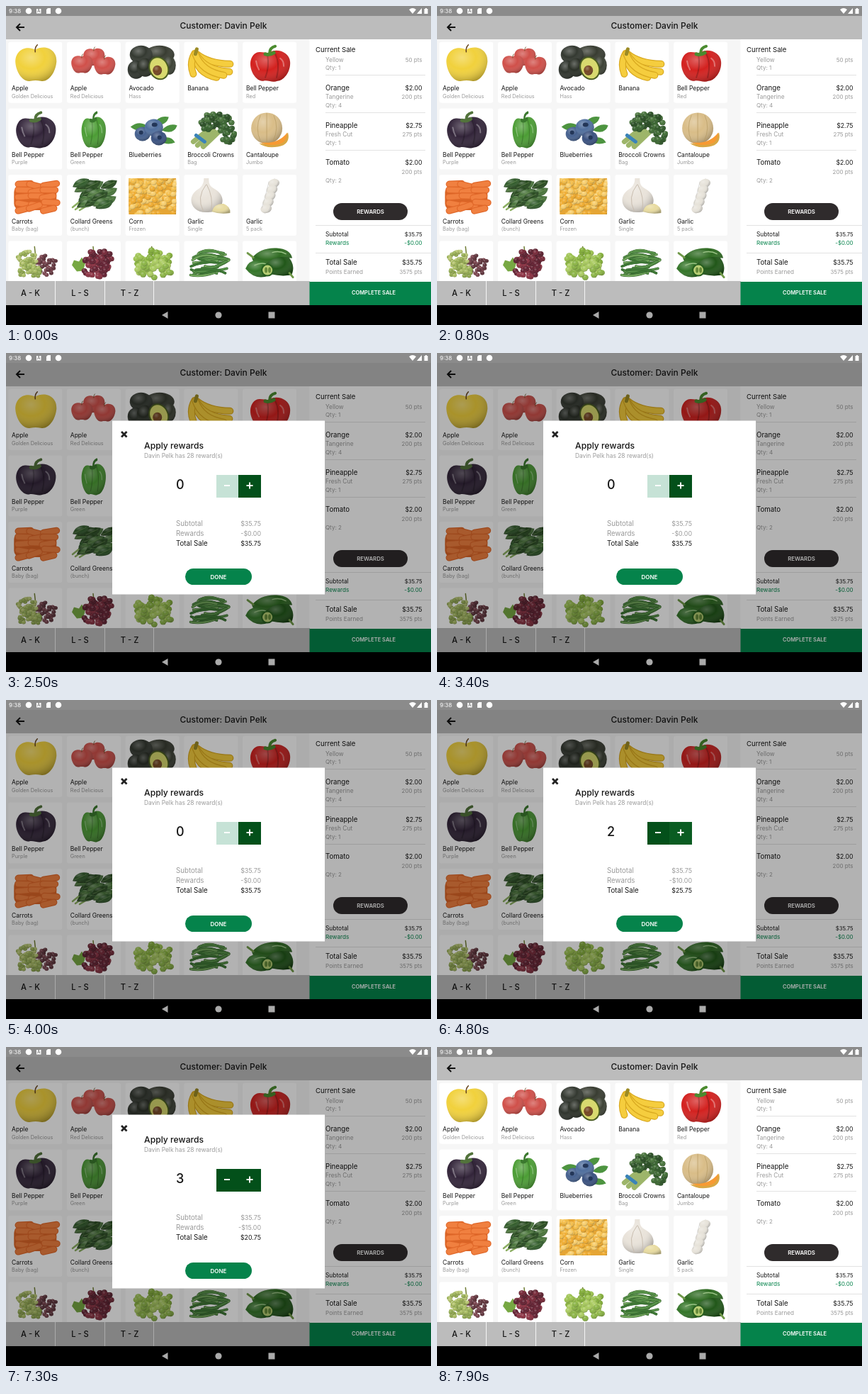
An HTML page for the animation above (8 s loop, 600 px wide and 450 px high).

```html
<!DOCTYPE html>
<html lang="en">
<head>
<meta charset="utf-8">
<title>Produce checkout</title>
<style>
  html, body { margin: 0; width: 100%; height: 100%; overflow: hidden; background: #000; }
  svg { display: block; width: 100vw; height: 100vh; font-family: Inter, sans-serif; }
</style>
</head>
<body>
<svg id="stage" viewBox="0 0 600 450"></svg>
<script>
const INK = '#161616', GRAY = '#999', GREEN = '#05834b', BAR = '#bcbcbc', BUTTON = '#03501a';
const LOOP = 8000, OPEN = 2500, CLOSE = 7600, TAPS = [4100, 4500, 5200];
const CUSTOMER = 'Davin Pelk';

let seed = 7;
const random = () => (seed = seed * 16807 % 2147483647) / 2147483647;

// Markup helpers
const rect = (x, y, w, h, fill, extra = '') =>
  `<rect x="${x}" y="${y}" width="${w}" height="${h}" fill="${fill}" ${extra}/>`;
const text = (x, y, string, size, fill = INK, anchor = 'start', weight = 400, extra = '') =>
  `<text x="${x}" y="${y}" font-size="${size}" fill="${fill}" text-anchor="${anchor}" font-weight="${weight}" ${extra}>${string}</text>`;
const path = (d, fill) => `<path d="${d}" fill="${fill}"/>`;
const line = (d, color, width = 1, cap = 'round') =>
  `<path d="${d}" fill="none" stroke="${color}" stroke-width="${width}" stroke-linecap="${cap}"/>`;
const oval = (x, y, rx, ry, fill, turn = 0) =>
  `<ellipse cx="${x}" cy="${y}" rx="${rx}" ry="${ry}" fill="${fill}" transform="rotate(${turn} ${x} ${y})"/>`;
const ball = (x, y, rx, ry, fill, turn = 0) =>
  oval(x, y, rx, ry, fill, turn) + oval(x, y, rx, ry, 'url(#shade)', turn);
const solid = (d, fill) => path(d, fill) + path(d, 'url(#shade)');
const place = (x, y, sx, sy, content) =>
  `<g transform="translate(${x} ${y}) scale(${sx} ${sy})">${content}</g>`;
const tube = (d, color, edge, width) => line(d, edge, width) + line(d, color, width * .75);

// Balls scattered over an ellipse
const cluster = (count, x, y, rx, ry, r, colors) => {
  let out = '';
  for (let i = 0; i < count; i++) {
    const angle = random() * 6.28, reach = Math.sqrt(random());
    out += ball((x + Math.cos(angle) * rx * reach).toFixed(1), (y + Math.sin(angle) * ry * reach).toFixed(1),
      r, r * .9, colors[i % colors.length]);
  }
  return out;
};

// Produce pictures, in card coordinates
const apple = color =>
  solid('M38 11C51 3 69 10 68 28C66 46 55 57 46 55C41 54 36 54 31 55C20 57 11 42 10 29C9 11 26 4 38 11Z', color) +
  line('M38 14Q37 8 41 4', '#6b4a22', 1.6);
const pepper = (color, stem) =>
  solid('M14 20C20 10 31 16 37 15C48 8 66 14 67 28C68 43 57 55 49 55C42 58 36 53 29 55C17 56 5 33 14 20Z', color) +
  line('M35 18Q38 35 32 50M46 17Q53 30 48 50', '#0003', 2) +
  line('M19 27Q20 34 23 39M53 23Q58 26 58 34', '#fff5', 2) +
  line('M32 17Q38 19 44 15', stem, 5) + line('M38 16Q38 8 46 6', stem, 4);
const bananas = () =>
  ['M18 17Q34 30 65 31', 'M17 17Q29 40 64 42', 'M16 17Q17 44 46 50', 'M15 16Q7 30 13 45', 'M16 17Q25 42 56 47']
    .map(d => tube(d, '#f5cd3e', '#d9a920', 10)).join('') + line('M16 17L18 10', '#9c8b25', 5);
const avocados = () =>
  ball(48, 18, 21, 13, '#393d32') + ball(22, 18, 16, 13, '#343931') + ball(15, 39, 12, 13, '#30352e') +
  ball(28, 36, 12, 13, '#2c3128') + ball(62, 33, 9, 13, '#3d4236') + oval(47, 37, 17, 14, '#4b5d22', 65) +
  oval(47, 37, 15, 12, '#d8d96f', 65) + ball(45, 40, 6.5, 7, '#754621');
const blueberries = () =>
  path('M7 26Q21 15 33 27Q19 36 7 26ZM39 25Q45 9 61 12Q59 24 39 25ZM51 31Q61 20 73 24Q68 38 51 31ZM52 42Q64 38 70 48Q58 53 50 46Z', '#4d9440') +
  ball(24, 36, 11, 10, '#45608e') + ball(40, 27, 13, 12, '#506f9e') + ball(47, 42, 11, 10, '#3b5280') +
  oval(41, 23, 4, 3, '#233658') + oval(22, 34, 3, 3, '#233658') + oval(48, 41, 3, 3, '#233658');
const broccoli = () =>
  line('M13 47L38 27M19 52L42 32M27 54L48 34', '#9db56a', 7) + line('M17 38L29 47', '#3b83b8', 5) +
  cluster(60, 44, 20, 24, 13, 4, ['#34602c', '#274b22', '#467239']) +
  cluster(20, 60, 36, 11, 13, 4, ['#2d5627', '#3e6b33']);
const cantaloupe = () =>
  ball(34, 28, 22, 22, '#d9bd88') +
  line('M25 10Q17 28 25 46M34 7V48M44 10Q52 28 43 46', '#b59a62', .7) +
  path('M23 49Q51 54 64 34Q68 51 50 54Q33 57 23 49Z', '#d9a743') +
  path('M25 48Q50 51 63 34Q62 50 48 51Q35 53 25 48Z', '#f79a33');
const carrots = () => {
  let out = rect(8, 16, 60, 34, '#d96426', 'rx="9"');
  for (let i = 0; i < 15; i++) {
    const x = 11 + i % 3 * 18 + random() * 4, y = 12 + Math.floor(i / 3) * 8.8 + random() * 4;
    out += tube(`M${x} ${y}l${14 + random() * 5} ${random() * 10 - 5}`, '#f08040', '#e0682a', 9.5);
  }
  return out;
};
const collards = () => {
  let out = line('M8 46L38 22M12 49L42 28M18 50L48 32', '#8cae62', 2.5);
  for (let i = 0; i < 28; i++) {
    const x = 19 + random() * 40, y = 11 + random() * 31;
    out += solid(`M${x - 11} ${y + 6}Q${x - 6} ${y - 9} ${x + 12} ${y - 5}Q${x + 10} ${y + 9} ${x - 11} ${y + 6}Z`,
      ['#315b2b', '#27491f', '#48733a'][i % 3]) + line(`M${x - 9} ${y + 5}L${x + 8} ${y - 3}`, '#83a267', .5);
  }
  return out;
};
const corn = () => `<g clip-path="url(#photo)">${rect(4.5, 5, 67, 51, '#e5a534')}` +
  cluster(190, 38, 30, 43, 34, 4, ['#f4bd47', '#efaa2d', '#f8ce6c']) + '</g>';
const garlic = () =>
  solid('M28 5L35 5Q34 16 43 20C61 30 57 52 34 53C9 55 3 31 19 21Q28 16 28 5Z', '#e9e3da') +
  line('M31 14Q17 32 27 51M32 14Q42 32 38 51', '#c8bdaf', 1) +
  solid('M39 52Q43 40 56 41Q66 45 65 54Q50 56 39 52Z', '#e8dba0');
const garlicPack = () => {
  let out = line('M45 7L31 53', '#ddd', 3);
  for (let i = 0; i < 5; i++) out += ball(44 - i * 2.7, 12 + i * 9, 8, 6, '#e7e3da', -15);
  return out + line('M37 10Q33 28 27 47M50 11Q46 31 37 51', '#bbb', .5);
};
const grapes = (parts, leaf = '') => leaf + line('M37 8L38 17', '#6f7c34', 1.5) +
  parts.map(([x, y, rx, ry, r, ...colors]) => cluster(42, x, y, rx, ry, r, colors)).join('');
const beans = () => {
  let out = '';
  for (let i = 0; i < 24; i++) {
    const x = 9 + random() * 22, y = 16 + random() * 33;
    out += tube(`M${x} ${y}Q${x + 15} ${y + random() * 18 - 11} ${x + 34} ${y * .75 + random() * 12}`,
      ['#58934a', '#3f7936', '#72a65c'][i % 3], '#315f2a', 3.6);
  }
  return out;
};
const jalapenos = () =>
  solid('M13 24Q25 9 48 10Q67 11 70 24Q48 23 31 34Q18 40 13 24Z', '#2f6b22') +
  solid('M31 34Q45 19 65 23Q75 35 69 48Q54 50 41 47Z', '#215719') +
  solid('M4 39Q9 25 25 28Q40 31 39 48Q18 57 4 39Z', '#347529') +
  line('M15 23L7 17M66 45L71 51', '#6f9848', 3) +
  oval(35, 41, 9, 9, '#285f20') + oval(35, 41, 7, 7, '#b9cf75') + oval(33, 41, 2, 4, '#668b3b') + oval(38, 41, 2, 4, '#668b3b') +
  line('M17 34Q25 30 32 32M42 16Q52 13 61 18', '#9bc386', 1.5);

const vineLeaf = path('M7 34L10 27L17 29L21 23L26 31L23 42L14 43Z', '#77a843');
const products = [
  ['Apple', 'Golden Delicious', apple('#f1d13c')],
  ['Apple', 'Red Delicious', [[18, 5], [1, 15], [33, 17]].map(([x, y]) => place(x, y, .52, .52, apple('#d0504a'))).join('')],
  ['Avocado', 'Hass', avocados()],
  ['Banana', '', bananas()],
  ['Bell Pepper', 'Red', pepper('#d3211f', '#4b8b2f')],
  ['Bell Pepper', 'Purple', pepper('#33253a', '#52733b')],
  ['Bell Pepper', 'Green', place(14, 0, .61, 1, pepper('#4c9d35', '#3b792e'))],
  ['Blueberries', '', blueberries()],
  ['Broccoli Crowns', 'Bag', broccoli()],
  ['Cantaloupe', 'Jumbo', cantaloupe()],
  ['Carrots', 'Baby (bag)', carrots()],
  ['Collard Greens', '(bunch)', collards()],
  ['Corn', 'Frozen', corn()],
  ['Garlic', 'Single', garlic()],
  ['Garlic', '5 pack', garlicPack()],
  ['', '', grapes([[53, 34, 15, 14, 3, '#76404a', '#5c3038'], [26, 26, 14, 13, 3, '#96ad51', '#b5c46e'], [30, 43, 18, 9, 3, '#8da64c', '#a9bd61']])],
  ['', '', grapes([[44, 23, 21, 10, 4, '#762737', '#591d2c'], [42, 39, 18, 12, 4, '#8b3041', '#621f30']], vineLeaf)],
  ['', '', grapes([[38, 25, 26, 13, 4.5, '#9bc24d', '#82ad38'], [42, 40, 26, 12, 4.5, '#a9ca5e', '#8ab344']])],
  ['', '', beans()],
  ['', '', jalapenos()],
];

const card = ([name, kind, picture], i) => {
  const x = 3.3 + i % 5 * 82.7, y = 50.8 + Math.floor(i / 5) * 93.6;
  return place(x, y, 1, 1, rect(0, 0, 76, 86, '#fff', 'rx="3"') + picture +
    text(4.8, 68.6, name, 8.5) + text(4.8, 79, kind, 7.3, GRAY));
};

const saleItem = (y, name, price, kind, points, quantity) =>
  text(451, y, name, 9.7) + text(587.5, y, price, 8.7, INK, 'end') +
  text(451, y + 12.6, kind, 8.4, GRAY) + text(587.5, y + 12.6, points + ' pts', 8, GRAY, 'end') +
  text(451, y + 24.6, 'Qty: ' + quantity, 8, GRAY);
const summary = (y, label, value, size, color, valueSize = 8.2) =>
  text(451, y, label, size, color) + text(587.5, y, value, valueSize, color, 'end');
const modalRow = (y, label, id, color) =>
  text(240, y, label, 9.7, color) + text(360, y, '$35.75', 8.9, color, 'end', 400, `id="${id}"`);

const statusBar = rect(0, 0, 600, 14, '#8b8b8b') + text(4, 10, '9:38', 8, '#fff') +
  oval(32, 7, 4.3, 4.3, '#fff') + rect(43, 4, 6.5, 6.5, '#fff') + text(46.2, 9.4, 'A', 6, '#888', 'middle', 700) +
  path('M57 5L59 3H63V11H57Z', '#fff') + oval(74, 7, 4.3, 4.3, '#fff') +
  path('M569 5Q574 1 579 5L574 11ZM580 11L587 3V11ZM590.5 4H592V3H594V4H595.5V11H590.5Z', '#fff');

const header = rect(0, 14, 600, 33, BAR) + line('M26 30H15M20 25L15 30L20 35', '#111', 2, 'butt') +
  text(307, 32.4, 'Customer: ' + CUSTOMER, 12, INK, 'middle', 500);

const salePanel = rect(428.5, 47, 171.5, 342, '#fff') + text(437, 64.6, 'Current Sale', 9.6) +
  text(451, 78.6, 'Yellow', 8.4, GRAY) + text(587.5, 78.6, '50 pts', 8, GRAY, 'end') + text(451, 90.2, 'Qty: 1', 8, GRAY) +
  saleItem(118.6, 'Orange', '$2.00', 'Tangerine', 200, 4) +
  saleItem(171.6, 'Pineapple', '$2.75', 'Fresh Cut', 275, 1) +
  saleItem(224.4, 'Tomato', '$2.00', '', 200, 2) +
  line('M451 97.5H592M451 150.5H592M451 203.5H592M437 309.5H600M437 348.5H600', '#e2e2e2', 1, 'butt') +
  rect(462, 278, 105, 24, '#2f2b2c', 'rx="12"') + text(514.5, 292.8, 'REWARDS', 7.8, '#fff', 'middle', 600) +
  summary(325, 'Subtotal', '$35.75', 8.4, INK, 7.6) + summary(337, 'Rewards', '-$0.00', 8.2, GREEN, 7.8) +
  summary(365.4, 'Total Sale', '$35.75', 9.7, INK, 8.7) + summary(378, 'Points Earned', '3575 pts', 8.1, GRAY, 7.8);

const footer = rect(0, 388, 429, 34, BAR) + rect(428.5, 389, 171.5, 33, GREEN) +
  line('M69.5 388V422M139.5 388V422M208.5 388V422', '#f4f4f4', 1, 'butt') +
  ['A - K', 'L - S', 'T - Z'].map((s, i) => text(34.5 + i * 70, 408.8, s, 11.2, INK, 'middle', 500)).join('') +
  text(519, 407, 'COMPLETE SALE', 7.5, '#fff', 'middle', 600);

const navigation = rect(0, 422, 600, 28, '#000') + path('M220 436L228.5 431V441Z', '#aaa') +
  oval(300, 436, 4.6, 4.6, '#aaa') + rect(370.5, 431.5, 9, 9, '#aaa');

const modal = `<g id="modal">${rect(0, 14, 600, 408, '#000', 'opacity=".3"')}${rect(150, 95.5, 300, 245, '#fff')}` +
  line('M163 111L170.5 118.5M170.5 111L163 118.5', '#222', 2.8, 'butt') +
  text(195, 134.6, 'Apply rewards', 12.2, INK, 'start', 500) +
  text(195, 148.4, CUSTOMER + ' has 28 reward(s)', 8.4, GRAY) +
  text(240, 192, '0', 18, INK, 'start', 500, 'id="count"') +
  rect(297, 172, 31, 32, BUTTON, 'id="minus"') + rect(328, 172, 32, 32, BUTTON, 'id="plus"') +
  line('M308 187H316M339.5 187H348.5M344 182.5V191.5', '#fff', 2, 'butt') +
  modalRow(244.4, 'Subtotal', 'subtotal', GRAY) + modalRow(258.4, 'Rewards', 'discount', GRAY) + modalRow(272.4, 'Total Sale', 'total', INK) +
  rect(253, 304, 94, 23, GREEN, 'rx="11.5"') + text(300, 318.6, 'DONE', 8, '#fff', 'middle', 600) + '</g>';

document.getElementById('stage').innerHTML = `<defs>
  <radialGradient id="shade" cx=".38" cy=".3" r=".75">
    <stop offset="0" stop-color="#fff" stop-opacity=".3"/>
    <stop offset=".45" stop-color="#fff" stop-opacity="0"/>
    <stop offset="1" stop-color="#000" stop-opacity=".28"/>
  </radialGradient>
  <clipPath id="photo"><rect x="4.5" y="5" width="67" height="51"/></clipPath>
</defs>` + rect(0, 47, 429, 341, '#f6f6f6') + products.map(card).join('') +
  salePanel + header + footer + statusBar + navigation + modal;

const part = id => document.getElementById(id);
const [modalNode, count, minus, plus, discount, total] =
  ['modal', 'count', 'minus', 'plus', 'discount', 'total'].map(part);

function render(now) {
  const t = now % LOOP;
  const rewards = TAPS.filter(tap => t >= tap).length;
  const pressed = TAPS.some(tap => t >= tap && t < tap + 350);
  modalNode.setAttribute('visibility', t >= OPEN && t < CLOSE ? 'visible' : 'hidden');
  count.textContent = rewards;
  discount.textContent = `-$${(rewards * 5).toFixed(2)}`;
  total.textContent = `$${(35.75 - rewards * 5).toFixed(2)}`;
  minus.setAttribute('fill', rewards ? BUTTON : '#c6e2d6');
  plus.setAttribute('fill', pressed ? '#0a5c22' : BUTTON);
}

const start = performance.now();
function tick() {
  render(performance.now() - start);
  requestAnimationFrame(tick);
}
tick();
</script>
</body>
</html>
```
